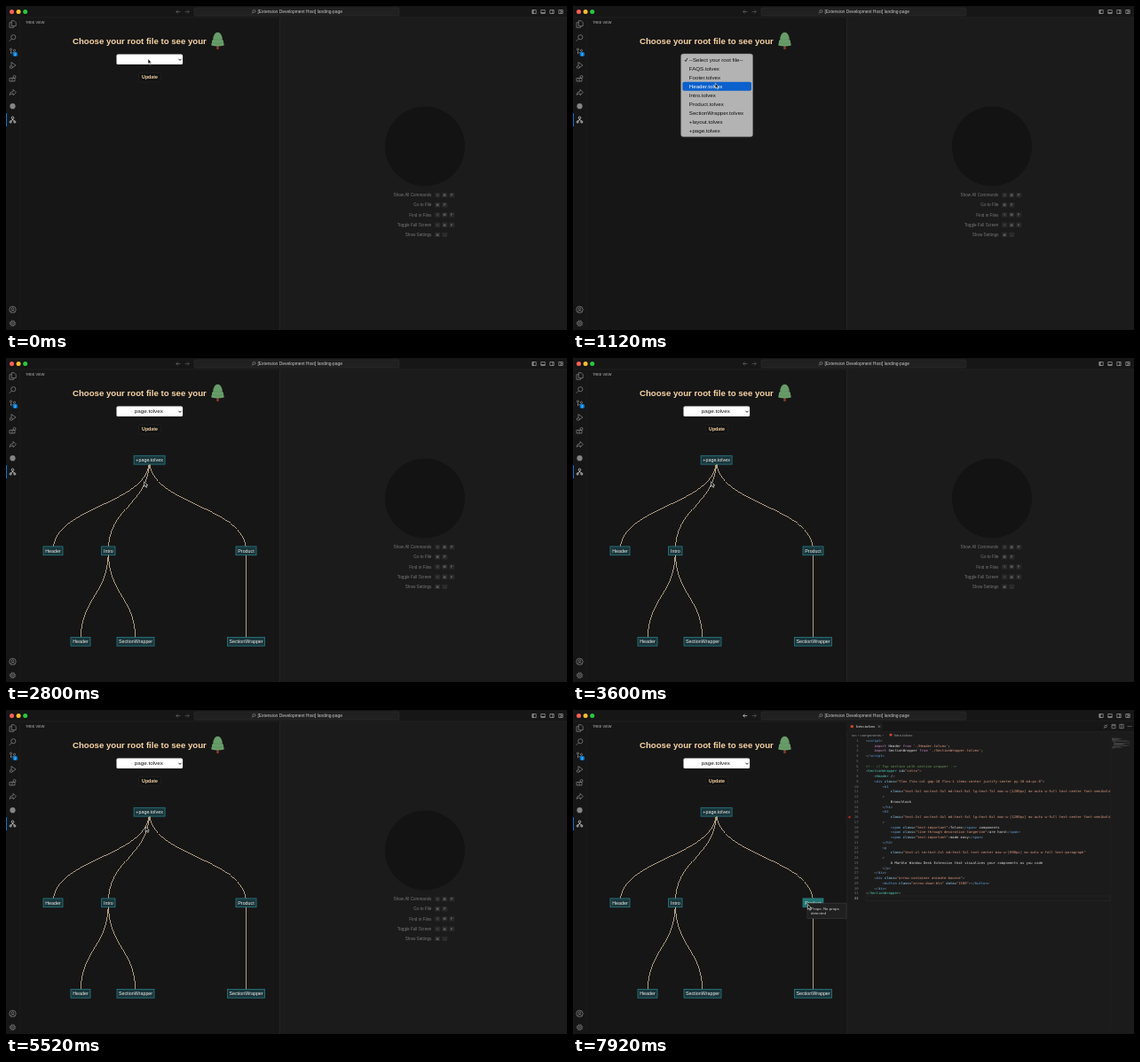
Write an HTML page that moves like this. It is 632 px wide and 366 px high and loops after 8 s.

```html
<!DOCTYPE html>
<html lang="en">
<head>
<meta charset="utf-8">
<title>Component tree</title>
<style>
html, body { margin: 0; width: 100%; height: 100%; overflow: hidden; background: #161616; }
svg { display: block; }
text { font-family: "Liberation Sans", Arial, sans-serif; white-space: pre; }
.mono { font-family: "DejaVu Sans Mono", monospace; }
.icon { fill: none; stroke: #858585; stroke-width: .75; }
.edge { fill: none; stroke: #f3d8ae; stroke-width: .7; shape-rendering: crispEdges; }
</style>
</head>
<body>
<svg id="stage" width="632" height="366" viewBox="0 0 632 366"></svg>
<script>
const CREAM = '#f8d5a4', LEFT = '#161616', RIGHT = '#1b1b1b', LINE = '#272727';
const NODE = '#1a363c', HOVER = '#20736f', EXT = '.tolvex';
const LOOP = 8000, STEP = 80;

const esc = s => s.replace(/&/g, '&amp;').replace(/</g, '&lt;');
const rect = (x, y, w, h, fill, more = '') =>
  `<rect x="${x}" y="${y}" width="${w}" height="${h}" fill="${fill}" ${more}/>`;
const dot = (x, y, r, fill) => `<circle cx="${x}" cy="${y}" r="${r}" fill="${fill}"/>`;
const path = (d, more = '') => `<path d="${d}" ${more}/>`;
// y is the vertical middle of the line
const text = (x, y, s, size, fill, more = '') =>
  `<text x="${x}" y="${y + size * .36}" font-size="${size}" fill="${fill}" ${more}>${esc(s)}</text>`;
const MID = 'text-anchor="middle"', END = 'text-anchor="end"', BOLD = 'font-weight="700"';
const group = (id, body) => `<g id="${id}">${body}</g>`;
const icon = (x, y, d, more = '') => path(d, `class="icon" transform="translate(${x} ${y})" ${more}`);
const ring = (x, y, r) => `M${x - r} ${y}a${r} ${r} 0 1 0 ${2 * r} 0a${r} ${r} 0 1 0 ${-2 * r} 0`;

function frame() {
  const lights = ['#ff5f57', '#febc2e', '#28c840'].map((c, i) => dot(6.5 + 7.6 * i, 6.5, 2.5, c)).join('');
  const layout = ['M-1.4 -2v4M-.9 -2v4', 'M-2.2 1h4.4', 'M.8 -2v4', 'M0 -2v4M0 0h2.2']
    .map((d, i) => icon(595 + 10 * i, 6.5, 'M-2.2 -2h4.4v4h-4.4z' + d, 'style="stroke:#c4c4c4;stroke-width:.55"')).join('');
  return rect(0, 0, 632, 366, LEFT) + rect(308, 13, 324, 353, RIGHT) +
    rect(0, 12.6, 632, .6, LINE) + rect(308, 13, .7, 353, LINE) + lights +
    icon(194, 6.5, 'M2.3 0h-4.6m2 -2l-2 2l2 2', 'id="back"') +
    icon(204, 6.5, 'M-2.3 0h4.6m-2 -2l2 2l-2 2', 'style="stroke:#555"') +
    rect(212, 2, 231, 9, '#202020', 'rx="1.5" stroke="#333" stroke-width=".5"') +
    icon(279, 6.3, ring(.4, -.4, 1.5) + 'M-.7 .7l-1.5 1.5') +
    text(283.5, 6.4, '[Extension Development Host] landing-page', 4.9, '#c8c8c8') + layout;
}

function activityBar() {
  return rect(15, 13, .5, 353, '#1f1f1f') + rect(0, 121, 1, 15, '#0078d4') +
    icon(7.5, 20.5, 'M-1.2 -3.8h3l1.9 1.9v4h-4.9zM-1.2 -1.8h-2.3v5.6h4.8v-1.7') +
    icon(7.5, 36, ring(.8, -.8, 2.6) + 'M-1.1 1.1l-2.6 2.6') +
    icon(7.5, 51.5, ring(-2, -2.5, 1.1) + ring(2, -1.3, 1.1) + 'M-2 -1.4v4M2 -.2q0 1.6 -4 1.8') +
    dot(10.4, 54.4, 2.7, '#0078d4') + text(10.4, 54.4, '2', 3.2, '#fff', MID) +
    icon(7.5, 67, 'M-1.5 -3.5l5 3.5l-4 2.8M-1.5 -3.5v3.5' + ring(-1.7, 2, 1.5)) +
    icon(7.5, 82, 'M-3.5 -.5h3v3.5h-3zM-.5 3h3v-3.5h-3' + ring(2, -2, 1.5)) +
    icon(7.5, 97.5, 'M-3.4 3q.2 -4 4 -4v-2.2l3.3 3.4l-3.3 3.2v-2q-2.5 -.2 -4 1.6z') +
    dot(7.5, 113.2, 3.1, '#858585') +
    icon(7.5, 128.5, ring(0, -2.2, 1.3) + ring(-2.3, 2.5, 1.1) + ring(2.3, 2.5, 1.1) +
      'M0 -.9v1.3M-2.3 1.4l2.3 -1.2l2.3 1.2', 'style="stroke:#e0e0e0"') +
    icon(7.5, 343, ring(0, 0, 3.7) + ring(0, -.8, 1.3) + 'M-2.4 2.7q2.4 -3.6 4.8 0') +
    icon(7.5, 358.5, ring(0, 0, 2.5) + ring(0, 0, .9)) +
    icon(7.5, 358.5, ring(0, 0, 3.3), 'stroke-dasharray="1.2 1.39"');
}

function form() {
  return text(22, 18.3, 'TREE VIEW', 3.9, '#bdbdbd') +
    text(75, 39.6, 'Choose your root file to see your', 9.63, CREAM, BOLD) +
    rect(237.3, 44, 2.4, 5, '#8d3b2c') +
    path('M238.5 29.8q3.4 .2 4.6 4.4q1.2 1.6 .4 3.4q2 1.6 1.6 3.8q1.2 2 .2 3.4q-6.8 1.6 -13.6 0q-1 -1.4 .2 -3.4q-.4 -2.2 1.6 -3.8q-.8 -1.8 .4 -3.4q1.2 -4.200 4.600 -4.400z', 'fill="#689c68"') +
    path('M234 37.6q4.5 1.6 9 0M232.5 41.6q6 1.8 12 0', 'fill="none" stroke="#568a58" stroke-width=".6"') +
    rect(124.5, 54.6, 74.6, 11.5, '#fff', 'rx="1.6"') +
    path('M194.4 59.7l1.6 1.7l1.6 -1.7', 'fill="none" stroke="#111" stroke-width=".9"') +
    group('chosen', text(140, 60.2, '+', 6.25, '#ddd') + text(144.8, 60.2, 'page' + EXT, 6.25, '#111')) +
    rect(149.5, 75.3, 25, 10.4, '#131313', 'rx="1.5" stroke="#2c2824" stroke-width=".5"') +
    text(162, 80.3, 'Update', 5.25, CREAM, MID + BOLD);
}

const options = ['--Select your root file--',
  ...['FAQS', 'Footer', 'Header', 'Intro', 'Product', 'SectionWrapper', '+layout', '+page'].map(n => n + EXT)];

function menu() {
  return rect(121.6, 54, 81, 93.8, '#b3b3b3', 'rx="2.8" stroke="#777" stroke-width=".5"') +
    rect(123.4, 0, 77.6, 10, '#0a60cc', 'id="pick" rx="1.8"') +
    options.map((s, i) => text(130.8, 60.7 + 10 * i, s, 6.15, '#111', 'class="opt"')).join('') +
    path('M125.8 61l1.2 1.5l2 -3.6', 'id="check" fill="none" stroke="#111" stroke-width=".8"');
}

// label, centre x, centre y, width, parent
const nodes = [
  ['+page' + EXT, 161.6, 115.2, 35],
  ['Header', 53, 217.8, 22, 0],
  ['Intro', 115.3, 217.8, 15.4, 0],
  ['Product', 270.5, 217.8, 23, 0],
  ['Header', 84, 320.3, 22, 2],
  ['SectionWrapper', 146, 320.3, 42, 2],
  ['SectionWrapper', 270.5, 320.3, 42, 3],
];

function tree() {
  const edges = nodes.slice(1).map(([, x, y, , p]) => {
    const [, px, py] = nodes[p], m = (y + py) / 2;
    return path(`M${px} ${py}C${px} ${m} ${x} ${m} ${x} ${y}`, 'class="edge"');
  });
  return edges.join('') + nodes.map(([s, x, y, w]) =>
    rect(x - w / 2, y - 4.9, w, 9.8, NODE, 'class="node" stroke="#2a7a83" stroke-width=".8"') +
    text(x, y + .1, s, 5.35, '#f2eee6', MID)).join('');
}

function welcome() {
  const rows = [['Show All Commands', '⇧⌘P'], ['Go to File', '⌘P'], ['Find in Files', '⇧⌘F'],
    ['Toggle Full Screen', '^⌘F'], ['Show Settings', '⌘,']];
  return dot(472, 158.5, 45, '#131313') + rows.map(([s, keys], i) => {
    const y = 213.6 + 11.2 * i;
    return text(479.4, y, s, 4.65, '#777', END) + [...keys].map((k, j) =>
      rect(483.2 + 8 * j, y - 2.7, 6, 5.4, '#2a2a2a', 'rx="1"') + text(486.2 + 8 * j, y, k, 3.7, '#8c8c8c', MID)).join('');
  }).join('');
}

const code = `<script>
    import Header from './Header${EXT}';
    import SectionWrapper from './SectionWrapper${EXT}';
<\/script>

<!-- // Top section with section wrapper -->
<SectionWrapper id="intro">
    <Header />
    <div class="flex flex-col gap-10 flex-1 items-center justify-center py-10 md:px-8">
        <h1
            class="text-4xl sm:text-5xl md:text-6xl lg:text-7xl max-w-[1200px] mx-auto w-full text-center font-semibold"
        >
            Branchlook
        </h1>
        <h2
            class="text-2xl sm:text-4xl md:text-5xl lg:text-6xl max-w-[1200px] mx-auto w-full text-center font-semibold"
        >
            <span class="text-important">Tolvex</span> components
            <span class="line-through decoration-tangerine">are hard</span>
            <span class="text-important">made easy</span>
        </h2>
        <p
            class="text-xl sm:text-2xl md:text-3xl text-center max-w-[800px] mx-auto w-full text-paragraph"
        >
            A Marble Window Desk Extension that visualizes your components as you code
        </p>
    </div>
    <div class="arrow-container animate-bounce">
        <button class="arrow-down-btn" data="1500"></button>
    </div>
</SectionWrapper>
`.split('\n');

const CHAR = 2.32, ROW = 5.75;

function paint(line) {
  const tint = (s, c) => `<tspan fill="${c}">${esc(s)}</tspan>`;
  const token = /(<!--.*-->)|("[^"]*"|'[^']*')|(\bimport\b|\bfrom\b)|(<\/?)(\w+)|(\w+)(?==)|(\/?>)|[^<"'>\w]+|\w+/g;
  return line.replace(token, (all, note, str, key, open, tag, attr, close) =>
    note ? tint(note, '#6a9955') : str ? tint(str, '#de9a80') : key ? tint(key, '#c586c0') :
    open ? tint(open, '#8c8c8c') + tint(tag, /^[A-Z]/.test(tag) ? '#4ec9b0' : '#5fa8e6') :
    attr ? tint(attr, '#9cdcfe') : close ? tint(close, '#8c8c8c') : esc(all));
}

function editor() {
  const size = CHAR / .602;
  const lines = code.map((raw, i) => {
    const line = raw.trimStart();
    return { line, i, indent: raw.length - line.length, y: 34.5 + ROW * i };
  });
  const rows = lines.map(({ line, i, indent, y }) =>
    text(321.5, y, String(i + 1), size, i == 31 ? '#ccc' : '#6e7681', END + ' class="mono"') +
    `<text class="mono" x="${330 + indent * CHAR}" y="${y + size * .36}" font-size="${size}" fill="#e0e0e0">${paint(line)}</text>`
  ).join('');
  const map = lines.map(({ line, i, indent }) =>
    rect(607 + indent * .2, 31.5 + i * .38, Math.min(line.length * .2, 18), .25, '#777')).join('');
  return rect(308.7, 13.2, 324, 353, RIGHT) + rect(308.7, 13.2, 324, 11, LEFT) + rect(308.7, 24, 324, .5, LINE) +
    rect(308.7, 13.2, 40.5, 11.3, RIGHT) +
    dot(314.3, 18.6, 1.7, '#d9432f') + text(319, 18.6, 'Intro' + EXT, 4.35, '#eee', 'font-style="italic"') +
    icon(345, 18.6, 'M-1.2 -1.2l2.4 2.4M1.2 -1.2l-2.4 2.4') +
    text(314, 28, 'src › components ›', 4.3, '#999') + dot(358, 28, 1.6, '#d9432f') +
    text(361.5, 28, 'Intro' + EXT, 4.3, '#999') +
    icon(600, 18.5, ring(0, 0, 1.3) + 'M-1 1l-1.2 1.2M1 -1l1.2 -1.2') +
    icon(609, 18.5, 'M-2 -2.2h4v4.4h-4zM-2 -.8h4') +
    icon(618, 18.5, 'M-2.2 -2.2h4.4v4.4h-4.4zM0 -2.2v4.4') +
    [-1.8, 0, 1.8].map(d => dot(627 + d, 18.5, .5, '#999')).join('') +
    dot(311.5, 121, 1.3, '#b3261e') +
    rect(330, 210, 275, 5.6, 'none', 'stroke="#282828" stroke-width=".5"') +
    `<clipPath id="page"><path d="M309 25H605.5V362H309z"/></clipPath><g clip-path="url(#page)">${rows}</g>` +
    rect(605.5, 30, .5, 332, '#222') + map;
}

const scrollbars = () => rect(628.2, 31, 3.8, 219, '#393939') + rect(330, 362.4, 253, 3.6, '#393939');

// start, end, x, y, width, lines
const tips = [
  [4240, 5440, 165, 114.2, 57.6, ['Props: No props detected']],
  [6160, 7120, 114.5, 219.6, 57.4, ['Props: No props detected']],
  [7760, 8000, 264, 218.2, 44, ['Props: No props', 'detected']],
];
const tip = ([, , x, y, w, lines]) =>
  rect(x, y, w, 6.8 + 5.2 * lines.length, '#202020', 'stroke="#3c3c3c" stroke-width=".6"') +
  lines.map((s, i) => text(x + 4, y + 6 + 5.1 * i, s, 4.4, '#d4d4d4')).join('');

const stage = document.getElementById('stage');
stage.innerHTML = frame() + activityBar() + form() + group('tree', tree()) + group('menu', menu()) +
  group('welcome', welcome()) + group('editor', editor()) + group('bars', scrollbars()) +
  tips.map((t, i) => group('tip' + i, tip(t))).join('') +
  path('M0 0v5.6l1.3 -1.2l1 2.2l1 -.5l-1 -2.1h1.8z', 'id="cursor" fill="#000" stroke="#fff" stroke-width=".6"');

const el = id => document.getElementById(id);
const show = (id, on) => el(id).setAttribute('visibility', on ? 'visible' : 'hidden');
const opts = [...document.querySelectorAll('.opt')], boxes = [...document.querySelectorAll('.node')];

// time, x, y of the pointer tip
const moves = [[0, 160, 59.8], [320, 160, 59.8], [640, 162, 65], [800, 162, 65], [1680, 156.2, 139.5],
  [2160, 156.2, 139.5], [2640, 155.6, 139.7], [3600, 155.6, 139.7], [4080, 165.2, 115.6],
  [5360, 165.2, 115.6], [6000, 114.2, 219.6], [7120, 114.2, 219.6], [7600, 264.4, 219.6], [8000, 264.4, 219.6]];

function pointer(t) {
  const i = moves.findIndex(m => m[0] > t), [t0, x0, y0] = moves[i - 1], [t1, x1, y1] = moves[i];
  const u = (t - t0) / (t1 - t0), k = u * u * (3 - 2 * u);
  return [x0 + (x1 - x0) * k, y0 + (y1 - y0) * k];
}

function draw(t) {
  const [x, y] = pointer(t);
  el('cursor').setAttribute('transform', `translate(${x} ${y})`);

  const row = Math.max(0, Math.min(8, Math.floor((y - 55.6) / 10)));
  show('menu', t >= 240 && t < 2160);
  el('pick').setAttribute('y', 55.7 + 10 * row);
  opts.forEach((o, i) => o.setAttribute('fill', i == row ? '#fff' : '#111'));
  el('check').setAttribute('stroke', row ? '#111' : '#fff');

  const grown = t >= 2240, opened = t >= 6320;
  show('chosen', t >= 2160);
  show('tree', grown);
  nodes.forEach(([, cx, cy, w], i) => {
    const over = grown && Math.abs(x - cx) < w / 2 && Math.abs(y - cy) < 4.9;
    boxes[i].setAttribute('fill', over ? HOVER : NODE);
  });
  tips.forEach(([from, to], i) => show('tip' + i, t >= from && t < to));
  show('welcome', !opened);
  show('editor', opened);
  show('bars', opened && t < 6960);
  el('back').style.stroke = opened ? '#ccc' : '#666';
}

function tick() {
  draw(Math.floor(performance.now() % LOOP / STEP) * STEP);
  requestAnimationFrame(tick);
}
tick();
</script>
</body>
</html>
```
